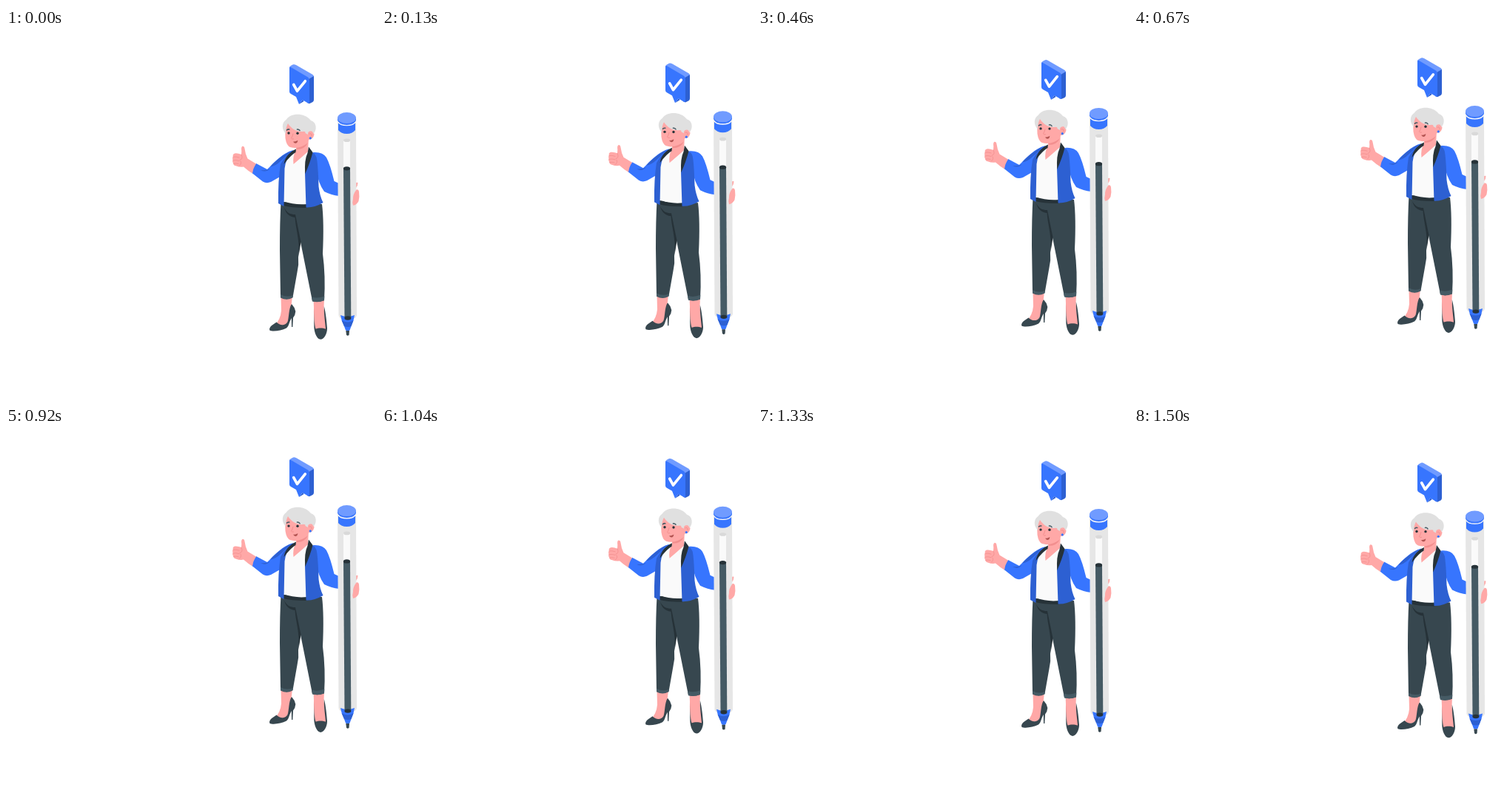
Recreate the animation shown at these times as an HTML page. Size 500x500 px, loop 1.54 s.

```html
<!DOCTYPE html>
<html lang="en">
<head>
<meta charset="utf-8">
<title>Thumbs up</title>
<style>
  html, body { margin: 0; height: 100%; overflow: hidden; background: #fff; }
  svg { display: block; width: 100vw; height: 100vh; }
  .blue { fill: #3775fe; }
  .deep { fill: #2d60d2; }
  .light { fill: #709bff; }
  .skin { fill: #ffa8a7; }
  .slate { fill: #37474f; }
  .steel { fill: #455a64; }
  .ink { fill: #263238; }
  .hair { fill: #e0e0e0; }
  .line { fill: none; stroke-linecap: round; stroke-linejoin: round; }
</style>
</head>
<body>
<svg viewBox="0 0 500 500">
  <g id="scene">
    <g id="bubble">
      <path class="light" d="M383 53Q384 51 388 49.300Q390 48.800 392 50L414.500 63Q416 64 416 66L410 69Z"/>
      <path class="deep" d="M409 69L416 65V97Q416 99 414.500 100L410 102.200L407 101ZM396 103L402.500 99L401 96.500Z"/>
      <path class="blue" d="M383 54Q383 52 385 53L408 66.500Q410 68 410 70V100Q410 102.500 408 101.500L400.500 97L396 103L392 93L385 89Q383 88 383 86Z"/>
      <path class="line" stroke="#fff" stroke-width="3.700" d="M388.700 76.500L393.500 85.200L404.300 71.800"/>
    </g>

    <g id="legs">
      <path class="skin" d="M371.500 362H387L385.500 376Q385 390 380 401L363 402Q371 394 372 382Z"/>
      <path class="slate" d="M356 407C357 402 362 400.500 365.500 397.500C370 402 377 403 380.500 397C382.500 392 382 378 386 373Q390 377 391.300 383Q391 388 388 391.500L387.300 404H386L385.800 392C383 396 382.500 403 379 405.500C372 409.500 360 410.500 356.500 408.800Z"/>
      <path class="skin" d="M415.500 366H430L429.500 378Q431 393 432.500 407H417.500Q415.500 390 416 378Z"/>
      <path class="slate" d="M416.300 378C416.500 390 416.500 400 418.500 406.500C422 405 428 405 432 406.500C431 396 429.500 386 429.800 376C432 384 433.500 398 434 406C434 413 430 420.800 425 420.800C420 420.800 416.500 411 416.300 404Z"/>
      <path class="slate" d="M371.500 235L427 238Q430 262 428 305Q432 335 430 368Q422 371.500 414 369L398 289Q396 300 395 310Q396 320 393.500 330L387.500 364Q379 368.500 371 363.500L370 300Q370 262 371.500 235Z"/>
      <path class="ink" d="M375 235L406 239V243Q384 243 375 240ZM376 243C380 250 384 252 391 252L398.500 289L395.500 308C397 285 392 275 390.500 256C382 255 378 250 376 243Z"/>
      <path class="steel" d="M371 360Q379 364.500 388 361L387.300 364.500Q379 369 371 364.500ZM413 363.500Q421 366 430.300 362.500L430 368.300Q422 371.500 414 369.500Z"/>
    </g>

    <g id="torso">
      <path class="blue" d="M415 168Q428 167 433 175Q438 184 443.500 207L450 210V227Q440 226 430 221Q422 210 419 192Z"/>
      <path class="blue" d="M388 165C374 169 364 180 353 191L338 183Q333 188 332.500 196L347 207.500Q352 210.500 358 208L372 200Z"/>
      <path class="deep" d="M385 166.500C374 171 365 179 357 187.500Q364 187 372 179ZM344 192Q351 196 357 190Q352 193 344 192Z"/>
      <path fill="#fafafa" d="M390 166L408 163L406 238Q390 239.500 375.500 234V185Q380 172 390 166Z"/>
      <path class="skin" d="M392 156L409 148L408 167Q398 176 388.500 184Q387 174 392 164Z"/>
      <path class="deep" d="M389 165Q378 175 376.500 190L375.500 241L368 237Q367.500 205 371 184Q379 170 389 165ZM411 167Q420 169 420.500 180Q422 194 422.500 214Q424 227 428.500 236Q417 243 405.500 242.500L404 196Z"/>
      <path class="ink" d="M392 163.500C384 167 377 174 375.500 184C381 177 385 172 391.500 168ZM409 160.500L414.500 168Q411 182 404.200 197Q403 178 407.500 169Z"/>
    </g>

    <g id="thumb">
      <path class="skin" d="M338 183.500L326.500 176.500Q323.500 171 322.500 163Q322 159.500 319.500 159.800Q317.500 160.500 318.300 166L318 171Q313 168.800 309 169.500Q306 170.500 306.800 173.500Q305.500 176 306.500 178.500Q305.500 181 307.300 183Q307.300 186 310.500 186.300Q316 188.500 321 187.500Q327 193 333 196.500Q334 189 338 183.500Z"/>
      <path class="line" stroke="#f28f8f" stroke-width=".8" d="M307 174.200Q311 173.500 315 175M306.700 179Q311 178 315 179.500M307.500 183.300Q311 182.500 314 183.500M318 171Q321 177 316 178.500M317 180Q319 183 315.500 186"/>
    </g>

    <g id="head">
      <path fill="#f28f8f" d="M392 160Q402 161 408 155Q404 164 393 164Z"/>
      <path class="skin" d="M378 128Q376.500 138 377.500 149Q379 159 384 161Q392 163.500 400 160Q407 157 409 151Q415 151 416.500 144Q416 138 411 138L403 126Z"/>
      <path class="hair" d="M378 143C372.500 137 372 128 379 123.500C384 115 403 113.500 412 125C420 127 420.500 138 415.500 143Q414 138 410.500 139.500Q407.500 140 408 144L404.500 142Q405 139 401 140C392 140.500 386 136 381 129Q378 134 378 143Z"/>
      <circle class="blue" cx="411.300" cy="148.800" r="1.600"/>
      <circle class="ink" cx="382" cy="142" r="1.700"/>
      <circle class="ink" cx="394" cy="142.200" r="1.700"/>
      <path class="line" stroke="#455a64" stroke-width="1.500" d="M379.500 138Q381 136.500 382.800 137M393.500 137Q395.500 136.500 397 138.500"/>
      <path class="line" stroke="#f28f8f" stroke-width="1" d="M388 143Q386.500 148 385.500 149Q386 150.500 388.500 150M410 143Q413.500 141.500 413 146"/>
      <path fill="#b35452" d="M388 153.500Q391.500 154 394.300 151.800Q394 156 390.800 155.800Q389 155.500 388 153.500Z"/>
    </g>

    <g id="pen">
      <path class="skin" d="M470 211Q473 208 475.500 209Q475.500 213 473 216Z"/>
      <path fill="#e6e6e6" d="M448 124H473L474 388Q473 394 462 394Q450 394 449.500 388Z"/>
      <path fill="#fafafa" d="M456 152H465V190H456Z"/>
      <ellipse cx="460.600" cy="151.800" rx="4.500" ry="2.300" fill="#d9d9d9"/>
      <path class="blue" d="M452 388Q461 392 471 388Q470 396 466.500 403L464.500 408.500Q462 410 459 408.500L457 403Q453 395 452 388Z"/>
      <path class="deep" d="M453.500 395Q462 400 469.500 395L466.500 403Q462 405 457 403Z"/>
      <path class="slate" d="M459.300 409H464L463.600 414.500Q461.800 417 460 414.500Z"/>
      <path class="steel" d="M456 190H465L466.300 391H457.500Z"/>
      <ellipse class="ink" cx="460.500" cy="189.800" rx="4.600" ry="2.600"/>
      <ellipse class="ink" cx="461.900" cy="392" rx="4.500" ry="2.700"/>
      <path class="blue" d="M449 128Q460 135 472 128V138Q468 143 460.500 143Q453 143 449 138Z"/>
      <path class="blue" d="M448 121.500H473V124.500Q471 131 460.500 131Q450 131 448 124.500Z"/>
      <path class="line" stroke="#fff" stroke-width="1.100" d="M449 127.500Q452 131.800 460.500 131.800Q469 131.800 472 127.500"/>
      <ellipse class="light" cx="460.500" cy="121.500" rx="12.500" ry="7.500"/>
      <path class="skin" d="M473.500 218.500Q476.500 217.500 477 221Q478 228 476.500 234Q474 239 469 239.800Q467.500 236 469 231Q468.500 225 473.500 218.500Z"/>
    </g>
  </g>
</svg>
<script>
  const LOOP = 1540, STEPS = 37, PEAK = 717, RISE = 10, HALF = 750;
  const scene = document.getElementById('scene');

  // Linear float: up to the peak and back down, in 24 fps steps.
  function draw(now) {
    const step = Math.floor((now % LOOP) / LOOP * STEPS + 1e-6);
    const time = step * LOOP / STEPS;
    const lift = Math.max(0, RISE * (1 - Math.abs(time - PEAK) / HALF));
    scene.setAttribute('transform', `translate(0 ${(0.44 - lift).toFixed(3)})`);
  }

  const start = performance.now();
  function tick() {
    draw(performance.now() - start);
    requestAnimationFrame(tick);
  }
  tick();
</script>
</body>
</html>
```
